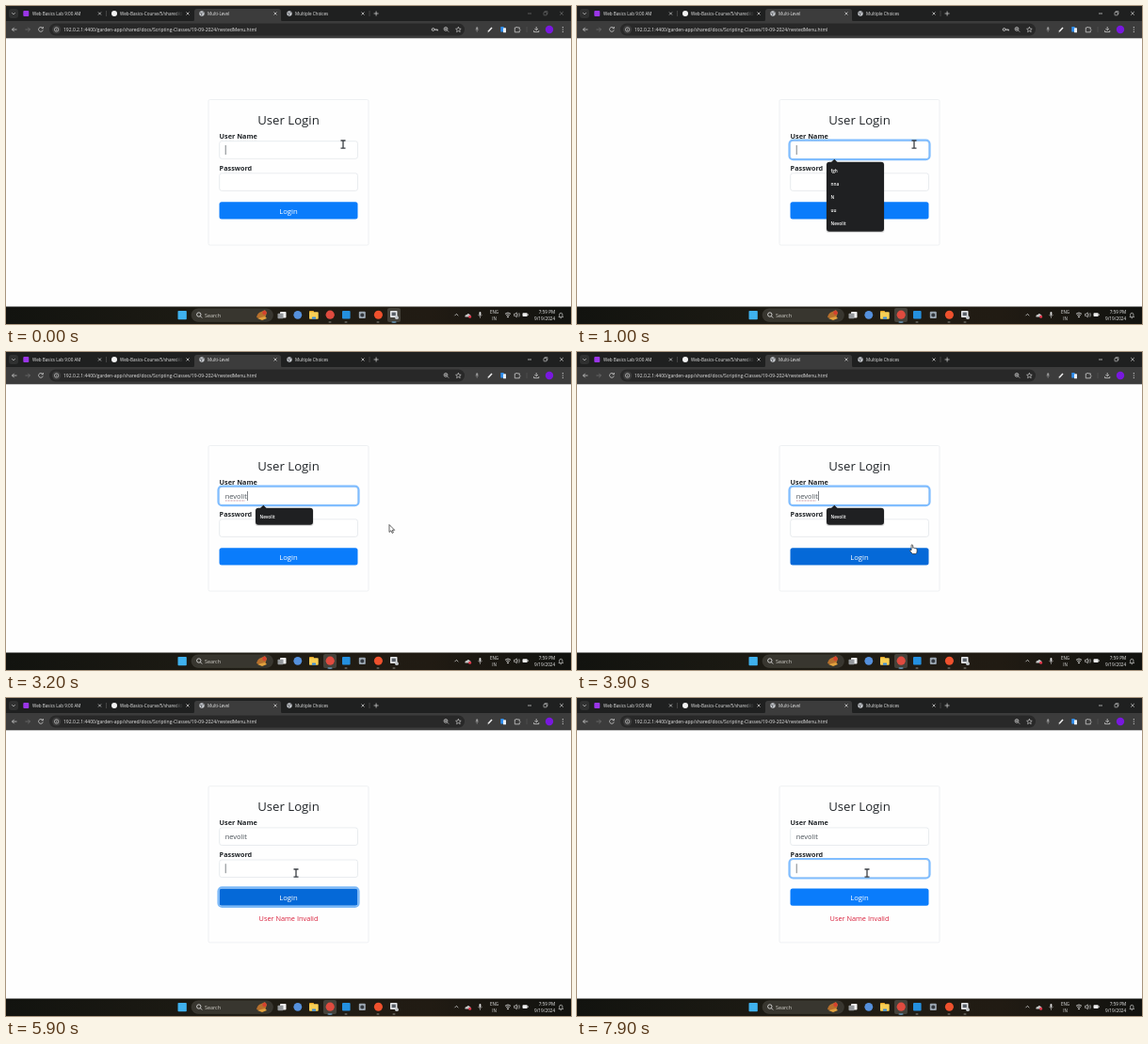
An HTML page that plays this animation: 600 by 338 pixels, repeating every 8000 ms.

```html
<!DOCTYPE html>
<html lang="en">
<head>
<meta charset="utf-8">
<title>User Login</title>
<style>
  html, body { margin: 0; width: 100%; height: 100%; overflow: hidden; background: #fefefe; }
  svg { display: block; width: 100vw; height: 100vh; font-family: "Open Sans", "Noto Sans", sans-serif; }
  text { white-space: pre; }
</style>
</head>
<body>
<svg id="stage" viewBox="0 0 600 338"></svg>
<script>
const LOOP = 8000, STEP = 100;
const NAME = "nevolit";
const SUGGESTIONS = ["fgh", "nna", "N", "uu", "Nevolit"];

// Markup helpers
const rect = (x, y, w, h, fill, r = 0, more = "") =>
  `<rect x="${x}" y="${y}" width="${w}" height="${h}" fill="${fill}" rx="${r}" ${more}/>`;
const dot = (x, y, r, fill, more = "") =>
  `<circle cx="${x}" cy="${y}" r="${r}" fill="${fill}" ${more}/>`;
const line = (d, stroke = "#ddd", w = 0.7, more = "") =>
  `<path d="${d}" fill="none" stroke="${stroke}" stroke-width="${w}" ${more}/>`;
const shape = (d, fill, more = "") => `<path d="${d}" fill="${fill}" ${more}/>`;
const text = (x, y, size, str, fill = "#e6e6e6", more = "") =>
  `<text x="${x}" y="${y}" font-size="${size}" fill="${fill}" ${more}>${str}</text>`;
const group = (id, body, more = "") => `<g id="${id}" ${more}>${body}</g>`;

const cross = (x, y, s = 1.5) =>
  line(`M${x - s} ${y - s}l${2 * s} ${2 * s}m0 ${-2 * s}l${-2 * s} ${2 * s}`);
const globe = (x, y) =>
  dot(x, y, 2.7, "#c8cbd0") + line(`M${x - 2} ${y - 1}l2 1l-.5 2M${x + 2} ${y - 1.4}l-1.6 .5`, "#4a4c50", 0.8);
const ring = (id, y, color) =>
  rect(225.5, y - 1, 149, 20.5, "none", 4, `id="${id}" stroke="${color}" stroke-width="2.2"`);
const field = y => rect(226.7, y, 146.8, 18.6, "#fff", 2.5, 'stroke="#dadfe4" stroke-width=".6"');

function tabStrip() {
  return rect(0, 0, 600, 17, "#1f2020") +
    rect(3, 3, 10, 10, "#303131", 3) + line("M6.3 7.2l1.7 1.7l1.7-1.7") +
    rect(18.3, 5, 6, 6, "#9a36e8", 1) + text(28, 9.8, 4.6, "Web Basics Lab 9:00 AM") + cross(99.5, 8) +
    line("M106.5 5v6", "#555") +
    dot(115, 8, 3, "#f2f2f2") + text(121, 9.8, 4.6, "Web-Basics-Course/5/shared/do", "url(#fade)") + cross(193, 8) +
    shape("M197 17q3 0 3-3V6q0-3 3-3h86q3 0 3 3v8q0 3 3 3z", "#3c3c3c") +
    globe(208, 8) + text(214, 9.8, 4.6, "Multi-Level") + cross(286, 8) +
    globe(301, 8) + text(307, 9.8, 4.6, "Multiple Choices") + cross(379, 8) +
    line("M386 5v6", "#555") + line("M390.6 8h5M393.1 5.5v5") +
    group("controls", line("M554 8h4") + rect(571, 6.6, 3.2, 3.2, "none", 0.4, 'stroke="#ddd" stroke-width=".6"') +
      line("M572 6.4v-.8h3v3h-.7", "#ddd", 0.5) + cross(590, 7.8, 1.8));
}

function toolbar() {
  return rect(0, 16, 600, 18.3, "#3c3c3c") +
    line("M11.5 25h-5m2.2-2.2l-2.2 2.2l2.2 2.2") +
    line("M20.5 25h5m-2.2-2.2l2.2 2.2l-2.2 2.2", "#777") +
    line("M38.8 23.3a2.4 2.4 0 1 0 .5 2.2M39.4 22v1.8h-1.8") +
    rect(46, 18.6, 441, 12.8, "#282828", 6.4) +
    dot(53.6, 25, 4.6, "#3c3c3c") + dot(53.6, 25, 2.2, "none", 'stroke="#ddd" stroke-width=".6"') +
    line("M53.6 24.7v1.5M53.6 23.6v.5", "#ddd", 0.6) +
    text(61, 26.8, 5, "192.0.2.1:4400/garden-app/shared/docs/Scripting-Classes/19-09-2024/nestedMenu.html") +
    group("key", dot(453.6, 25, 1.4, "none", 'stroke="#ddd" stroke-width=".8"') + line("M455 25h3.4v1.4M457 25v1.2", "#ddd", 0.8)) +
    dot(467, 24.4, 1.9, "none", 'stroke="#ddd" stroke-width=".7"') + line("M468.4 25.8l1.8 1.8M466.1 24.4h1.8M467 23.5v1.8", "#ddd", 0.6) +
    line("M480.4 22.2l.8 1.9l2 .2l-1.5 1.3l.5 2l-1.8-1.1l-1.8 1.1l.5-2l-1.5-1.3l2-.2z", "#ddd", 0.6) +
    rect(499.2, 22.2, 2, 3.4, "#999", 1) + line("M498.4 25q1.8 2.4 3.6 0M500.2 26v1.8", "#999", 0.5) +
    line("M512 27.3l4-4.2", "#f2f2f2", 1.5) + line("M511.4 28l1-.9", "#aaa") +
    rect(525.3, 22, 3.4, 5.5, "#2e8ef0", 0.5) + rect(528, 23.2, 3, 5, "#e8eef5", 0.5) +
    line("M540.3 23h1.4q.2-1.6 1.3-.1h2.3v1.7q1.5.8 0 1.6v1.6h-5z", "#ddd", 0.7) +
    line("M553 22v6", "#555") +
    line("M563.2 22v3.6m-1.8-1.6l1.8 1.8l1.8-1.8M560.6 26v1.6h5.2v-1.6") +
    dot(577, 25, 4.2, "#7918df") +
    [22.7, 25, 27.3].map(y => dot(591.3, y, 0.6, "#ddd")).join("");
}

function taskbar() {
  const running = [344, 361, 395, 412].map(x => rect(x - 1.5, 335.6, 3, 0.9, "#8b8b86", 0.4)).join("");
  return rect(0, 319.5, 600, 18.5, "url(#bar)") + running +
    rect(0, 0, 14, 15, "#45423a", 2, 'id="active"') + rect(0, 0, 5, 1, "#6fb4e8", 0.5, 'id="mark"') +
    rect(182.5, 324, 9.3, 9.3, "#3fb1ee", 0.8) +
    rect(197, 321.8, 86.5, 13.6, "#38362f", 6.8, 'stroke="#4b483f" stroke-width=".4"') +
    dot(204.8, 328, 2.2, "none", 'stroke="#eee" stroke-width=".8"') + line("M206.4 329.7l1.8 1.8", "#eee", 0.8) +
    text(211, 330.6, 5.4, "Search", "#d4d2cc") +
    shape("M266 331q1-5 5-6l4-2l2 3l-2 6h-6z", "#b7702d") + dot(274.5, 326, 2.2, "#d5412f") +
    shape("M267 332l8-2l2 2l-5 2z", "#e2a23e") +
    rect(291, 325, 6.5, 6.5, "#f0f0f0", 0.8) + rect(288.5, 326.8, 6, 5.5, "#96999c", 0.8) +
    dot(309.8, 328.3, 4.4, "#5590dc") +
    rect(322, 324, 5, 4, "#e6a423", 0.7) + rect(322, 325.2, 9.7, 7.6, "#f7ce55", 0.8) + rect(325, 330.5, 4, 2.3, "#3f8fd8", 0.5) +
    dot(344.2, 328.2, 4.6, "#df4b3f") +
    rect(357, 324, 8.6, 8.6, "#2490df", 1) +
    rect(374.8, 324.8, 7, 7.2, "#9ba6b1", 1) + dot(378.3, 328.4, 2, "#33383f") +
    dot(395.4, 328.2, 4.5, "#ef512d") +
    rect(408, 324, 7.5, 7, "#e4e6e8", 0.8) + rect(409.6, 325.6, 4.3, 3.6, "#5a6068") + dot(415, 331.2, 1.9, "#c4c8cc") +
    line("M476.5 329.2l1.9-1.9l1.9 1.9", "#eee") +
    shape("M487.5 330.5q-.5-2.5 2-2.6q1.2-2 3 .2q1.6.5.9 2.4z", "#c9c9c9") + dot(492.6, 330.3, 1.5, "#e0364a") +
    rect(502.5, 325, 1.9, 4, "#ddd", 0.9) + line("M501.4 328.2q2 3.2 4.1 0M503.5 329.8v2", "#ddd", 0.5) +
    text(518.5, 327, 4.5, "ENG", "#eee", 'text-anchor="middle"') + text(518.5, 334, 4.5, "IN", "#eee", 'text-anchor="middle"') +
    line("M530 327.3q3-2.6 6 0M531.2 328.8q1.8-1.6 3.6 0", "#eee", 0.8) + dot(533, 330.4, 0.8, "#eee") +
    line("M539.6 327.2h1.2l1.5-1.4v5l-1.5-1.4h-1.2z", "#eee", 0.6) + line("M543.5 327q1 1.3 0 2.6M544.7 326q1.8 2.3 0 4.6", "#eee", 0.5) +
    rect(548.5, 326.2, 5.2, 3.8, "#eee", 0.8) + line("M554.4 327.4v1.5", "#eee") +
    text(583.2, 327, 4.7, "7:59 PM", "#eee", 'text-anchor="end"') + text(583.2, 334, 4.7, "9/19/2024", "#eee", 'text-anchor="end"') +
    line("M587 330.6h4.6l-.7-1.2v-1.5a1.6 1.6 0 0 0-3.2 0v1.5zM588.6 331.7h1.4", "#eee", 0.6);
}

function form() {
  const mid = 'text-anchor="middle"';
  return rect(215, 99.5, 170, 154.6, "#fefefe", 1.5, 'id="card" stroke="#e9ebee" stroke-width=".7"') +
    text(300, 125.6, 13.2, "User Login", "#212529", mid + ' font-weight="500"') +
    text(226.6, 141.2, 7.25, "User Name", "#212529", 'font-weight="700"') +
    text(226.6, 175.3, 7.25, "Password", "#212529", 'font-weight="700"') +
    field(143.7) + ring("nameRing", 143.7, "#80bdff") + field(177.8) + ring("passRing", 177.8, "#80bdff") +
    text(232.8, 156.1, 7.4, "", "#495057", 'id="typed"') +
    line("M233 158h20.5", "#a5566b", 0.6, 'id="squiggle" stroke-dasharray="1 .5"') +
    rect(0, 0, 0.7, 10, "#495057", 0, 'id="caret"') +
    rect(226.5, 208.2, 147, 18.4, "#0a7cfb", 2.5, 'id="button"') + ring("buttonRing", 208.2, "#7cb9f8") +
    text(300, 220.5, 7.7, "Login", "#fff", mid) +
    text(300, 243.2, 7.35, "User Name Invalid", "#d9203c", mid + ' id="error"');
}

const cursors =
  group("beam", line("M-2.5-4h1.8q.7 0 .7.8v6.6q0 .8-.7.8h-1.8M2.5-4h-1.8q-.7 0-.7.8M2.5 4.2h-1.8q-.7 0-.7-.8", "#3b3f44", 1.3)) +
  group("arrow", shape("M0-4.5v8l1.9-1.7l1.2 2.7l1.3-.6l-1.2-2.6h2.5z", "#fff", 'stroke="#222" stroke-width=".7"')) +
  group("hand", shape("M-2.2-4q1-1 1.6.2v2.8q1-.6 1.6.2q1-.4 1.4.4q1.4-.2 1.4 1v2.2q0 1.7-1.3 2.6h-3.4q-1.6-1.6-2.9-3.6q.4-1.4 1.6-.2z", "#fff", 'stroke="#222" stroke-width=".7"'));

document.getElementById("stage").innerHTML =
  `<defs>
    <linearGradient id="bar"><stop stop-color="#12130f"/><stop offset=".45" stop-color="#201d15"/><stop offset=".75" stop-color="#211b13"/><stop offset="1" stop-color="#11120f"/></linearGradient>
    <linearGradient id="fade" gradientUnits="userSpaceOnUse" x1="178" x2="188"><stop stop-color="#e6e6e6"/><stop offset="1" stop-color="#e6e6e6" stop-opacity="0"/></linearGradient>
  </defs>` +
  rect(0, 0, 600, 338, "#fefefe") + group("form", form()) +
  group("menu", "") + tabStrip() + toolbar() + taskbar() + group("cursor", cursors);

const $ = id => document.getElementById(id);
const set = (id, attrs) => { for (const k in attrs) $(id).setAttribute(k, attrs[k]); };
const show = (id, on) => set(id, { opacity: +on });
const clamp = v => Math.max(0, Math.min(1, v));
const fade = (t, from, to = Infinity) => clamp((t - from) / 150) * (1 - clamp((t - to) / 150));

const TYPE_START = 1200, TYPE_GAP = 200, SUBMIT = 4400, REFOCUS = 5900;
const PATH = [[0, 358, 147], [2700, 358, 147], [3200, 407, 188], [3500, 407, 188],
  [4200, 325, 223], [5200, 325, 223], [5800, 308, 186], [LOOP, 308, 186]];

function pointer(t) {
  const i = PATH.findIndex(p => p[0] > t);
  const [t0, x0, y0] = PATH[i - 1], [t1, x1, y1] = PATH[i];
  const u = (t - t0) / (t1 - t0), e = u * u * (3 - 2 * u);
  return [x0 + (x1 - x0) * e, y0 + (y1 - y0) * e];
}

function drawMenu(t, typed) {
  const items = SUGGESTIONS.filter(s => s.toLowerCase().startsWith(typed));
  const h = 4 + items.length * 14;
  $("menu").innerHTML = t < 300 || t >= SUBMIT ? "" :
    rect(264.4, 166.2, 62.2, h + 0.8, "#0002", 3) +
    shape("M269.5 166.5l3.8-3.8l3.8 3.8z", "#1f2022") + rect(265, 165.8, 61, h, "#1f2022", 3) +
    items.map((s, i) => text(269.5, 176.7 + 14 * i, 4.7, s, "#fff", 'font-weight="600"')).join("");
}

function draw(t) {
  const typed = NAME.slice(0, Math.max(0, Math.floor((t - TYPE_START) / TYPE_GAP) + 1));
  const sent = t >= SUBMIT, focused = t >= 100;

  set("form", { transform: `translate(0 ${sent ? -5.8 : 0})` });
  set("card", { height: sent ? 166.2 : 154.6 });
  $("typed").textContent = typed;
  show("squiggle", t >= 2700 && !sent);
  show("error", sent);
  show("nameRing", fade(t, 50, SUBMIT));
  show("buttonRing", fade(t, SUBMIT, REFOCUS));
  show("passRing", fade(t, REFOCUS));
  drawMenu(t, typed);

  const inPass = t >= REFOCUS;
  show("caret", !sent || inPass);
  set("caret", { x: 232.8 + (typed && !inPass ? $("typed").getComputedTextLength() + 0.2 : 0), y: inPass ? 182 : 148 });

  show("controls", focused ? 1 : 0.45);
  show("key", t < TYPE_START);
  const app = focused ? 344 : 412;
  set("active", { x: app - 7, y: 321 });
  set("mark", { x: app - 2.5, y: 335.5 });

  const [x, y] = pointer(t);
  const top = sent ? 202.4 : 208.2;
  const inside = x > 226 && x < 374;
  const over = inside && y > top && y < top + 24;
  const overField = inside && (y < 163 || (y > top - 30.4 && y < top - 11.7));
  set("cursor", { transform: `translate(${x} ${y})` });
  show("hand", over);
  show("beam", overField && !over);
  show("arrow", !over && !overField);
  set("button", { fill: over || (sent && !(t > REFOCUS)) ? "#0569d8" : "#0a7cfb" });
}

function tick(now) {
  draw(Math.floor((now % LOOP) / STEP) * STEP);
  requestAnimationFrame(tick);
}
draw(0);
requestAnimationFrame(tick);
</script>
</body>
</html>
```
